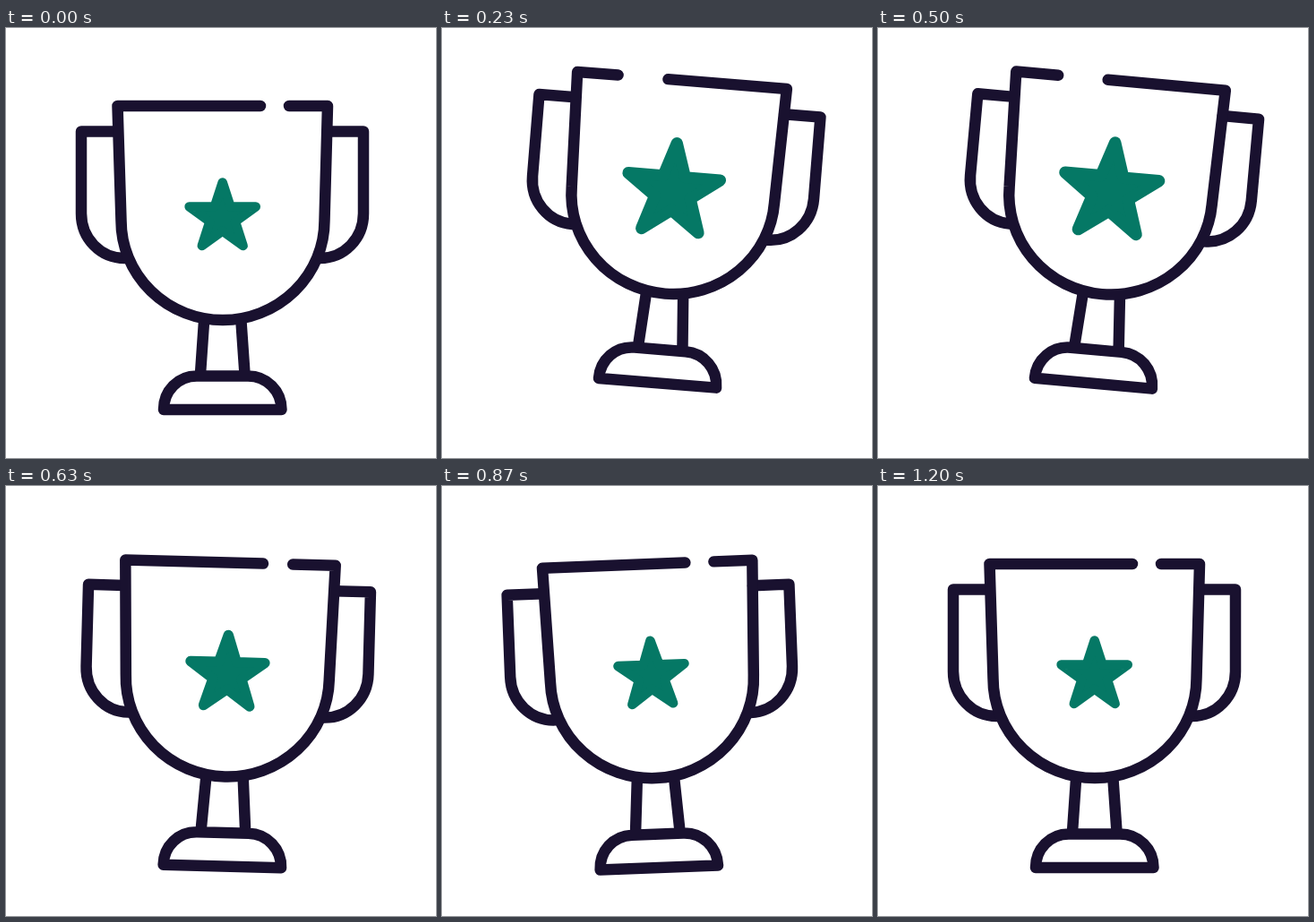
Animation of 480 by 480 pixels, one loop 1530 ms. Source, as an HTML page with a canvas:

```html
<!DOCTYPE html>
<html lang="en">
<head>
<meta charset="utf-8">
<title>Trophy</title>
<style>
  html, body { margin: 0; width: 100%; height: 100%; overflow: hidden; background: #fff; }
  canvas { display: block; width: 480px; height: 480px; }
</style>
</head>
<body>
<canvas id="stage" width="480" height="480"></canvas>
<script>
const ctx = document.getElementById('stage').getContext('2d');
const LOOP = 1530, STEP = 100 / 3;
const INK = '#19112f', GREEN = '#057865';
const PIVOT = { x: 242, y: 411 };

// Keys are [step, value] pairs.
const lift = track([[0, 0], [4, .585], [7, .89], [11, 1], [14, .95], [16, .75], [19, .045], [21, 0]]);
const grow = track([[0, 0], [4, .46], [7, .84], [11, 1], [14, .96], [16, .81], [19, .26], [22, 0]]);
const tilt = track([[0, 0], [4, 2.48], [7, 4.65], [11, 5.8], [14, 5.5], [16, 4.65], [19, 1.55],
  [23, -3.75], [24, -4], [29, 1.4], [30, 1.55], [32, 1.25], [36, 0]]);

// Monotone cubic interpolation that rests at every extreme.
function track(keys) {
  const rise = i => (keys[i + 1][1] - keys[i][1]) / (keys[i + 1][0] - keys[i][0]);
  const slopes = keys.map((_, i) => {
    if (i === 0 || i === keys.length - 1) return 0;
    const a = rise(i - 1), b = rise(i);
    return a * b > 0 ? 2 * a * b / (a + b) : 0;
  });
  return t => {
    const i = keys.findIndex(key => key[0] > t) - 1;
    if (i < 0) return keys[keys.length - 1][1];
    const [t0, v0] = keys[i], [t1, v1] = keys[i + 1];
    const d = t1 - t0, u = (t - t0) / d, w = 1 - u;
    return v0 * w * w * (1 + 2 * u) + v1 * u * u * (3 - 2 * u)
      + d * u * w * (slopes[i] * w - slopes[i + 1] * u);
  };
}

function drawCup(open) {
  ctx.beginPath();
  ctx.moveTo(284 - 128 * open, 87);
  ctx.lineTo(124.5, 87);
  ctx.lineTo(128.5, 215);
  ctx.ellipse(242, 215, 113.5, 111, 0, Math.PI, 0, true);
  ctx.lineTo(359, 87);
  ctx.lineTo(316 - 101 * open, 87);
  ctx.stroke();
}

function drawHandle(side) {
  const x = d => 241.5 + side * d;
  ctx.beginPath();
  ctx.moveTo(x(117), 115.5);
  ctx.lineTo(x(157.5), 115.5);
  ctx.lineTo(x(157.5), 207);
  ctx.bezierCurveTo(x(157.5), 235, x(136), 257, x(109), 257);
  ctx.stroke();
}

function drawStand() {
  ctx.beginPath();
  ctx.moveTo(221, 328);
  ctx.lineTo(217, 386);
  ctx.moveTo(262.5, 328);
  ctx.lineTo(266.5, 386);
  ctx.moveTo(176, 426);
  ctx.bezierCurveTo(176, 405, 192, 388.5, 213, 388.5);
  ctx.lineTo(270, 388.5);
  ctx.bezierCurveTo(291, 388.5, 307.5, 405, 307.5, 426);
  ctx.closePath();
  ctx.stroke();
}

function drawStar(scale) {
  ctx.beginPath();
  for (let i = 0; i < 10; i++) {
    const r = (i % 2 ? 15 : 39) * scale, a = i * Math.PI / 5;
    ctx.lineTo(241.7 + r * Math.sin(a), 211.5 - r * Math.cos(a));
  }
  ctx.closePath();
  ctx.fillStyle = ctx.strokeStyle = GREEN;
  ctx.lineWidth = 10.5 + 7 * (scale - 1);
  ctx.fill();
  ctx.stroke();
}

function draw(ms) {
  const step = Math.floor((ms % LOOP + 4) / STEP);
  const up = lift(step);
  ctx.fillStyle = '#fff';
  ctx.fillRect(0, 0, 480, 480);
  ctx.save();
  ctx.translate(PIVOT.x, PIVOT.y - 33.3 * up);
  ctx.rotate(tilt(step) * Math.PI / 180);
  ctx.translate(-PIVOT.x, -PIVOT.y);
  ctx.lineCap = ctx.lineJoin = 'round';
  ctx.lineWidth = 12.5;
  ctx.strokeStyle = INK;
  drawHandle(-1);
  drawHandle(1);
  drawStand();
  drawCup(up);
  drawStar(1 + .46 * grow(step));
  ctx.restore();
}

const start = performance.now();
function tick() {
  draw(performance.now() - start);
  requestAnimationFrame(tick);
}
tick();
</script>
</body>
</html>
```
